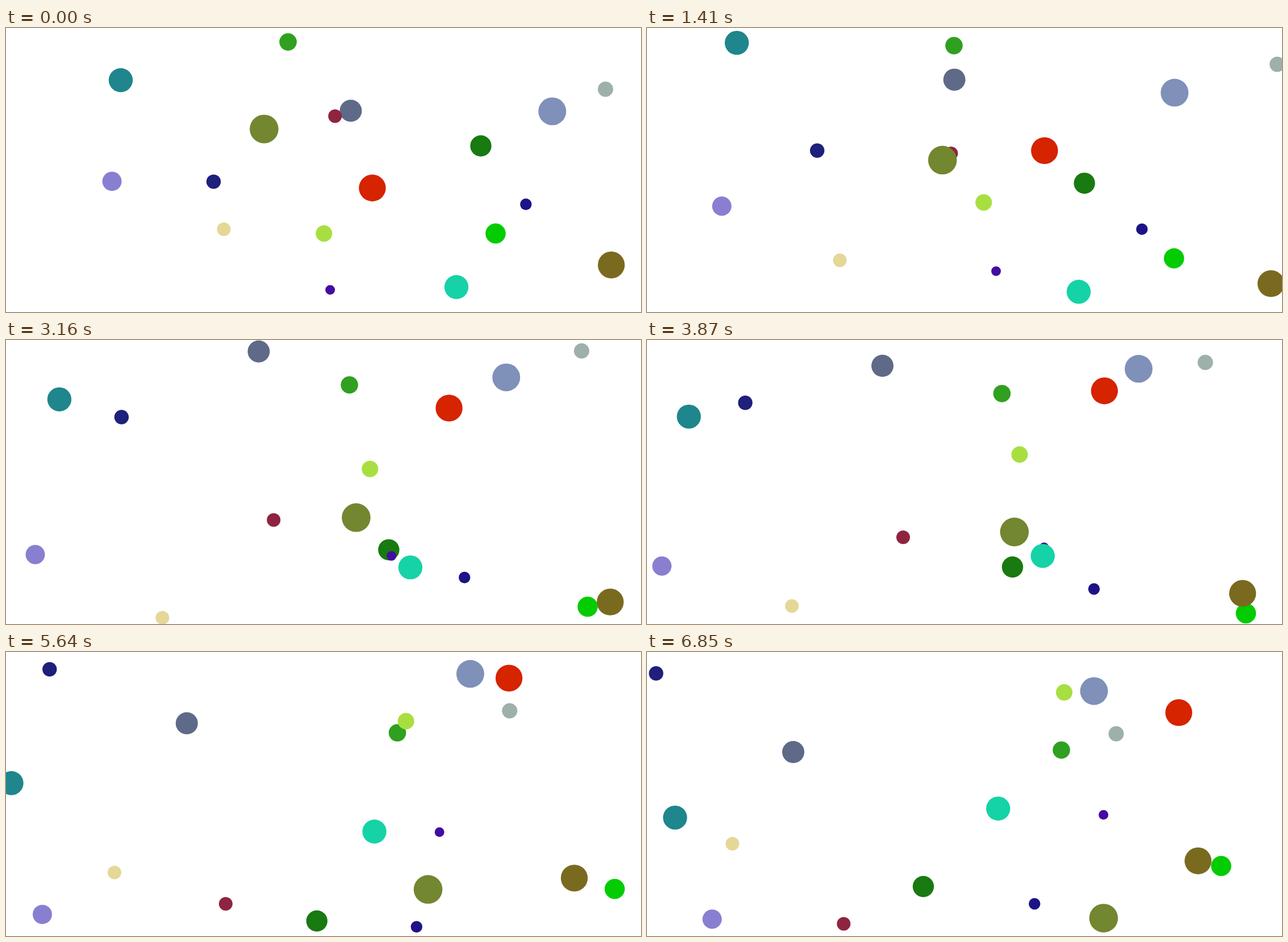
Recreate the animation shown at these times as an HTML page with a canvas. Size 1118x501 px, loop 6940 ms.

```html
<!DOCTYPE html>
<html lang="en">
<head>
<meta charset="utf-8">
<title>Bouncing balls</title>
<style>
html, body { margin: 0; width: 100%; height: 100%; overflow: hidden; background: #fff; }
canvas { display: block; }
</style>
</head>
<body>
<canvas id="stage" width="1118" height="501"></canvas>
<script>
const LOOP = 6940;
const UNIT = 0.8442; // pixels per speed unit and tick
const WALL = { left: -12, right: 1129, top: -3.9, bottom: 504.3 };

// x, y, radius, x speed, y speed, colour; painted back to front
const balls = [
  [607, 146, 19.5, -6, -5, '#5e6a87'],
  [579.3, 155.5, 12, -4, 6, '#8f2440'],
  [202, 92, 21.2, -4, -6, '#1e868c'],
  [496.6, 24.6, 15.3, 4, -3, '#30a020'],
  [1055.5, 108, 13.5, 6, -4, '#9eb0ab'],
  [836, 208, 18.7, -6, 6, '#187a10'],
  [186.6, 270.4, 17, -5, 4, '#897fd1'],
  [365.5, 271.1, 12.7, -6, -5, '#1f1f7c'],
  [645, 282.2, 23.7, 5, -6, '#d62300'],
  [915.3, 311, 10.2, -4, 4, '#1d1387'],
  [383.4, 355, 12, -4, 5, '#e5d797'],
  [559.8, 362.5, 14.5, 3, -5, '#a8df40'],
  [862, 362.5, 17.8, 6, 4, '#03cc03'],
  [1065.7, 418, 23.7, 3, 3, '#7a6a20'],
  [570.7, 462, 8.5, 4, -3, '#440ca2'],
  [793, 457, 21.2, -3, 4, '#15d3a6'],
  [454.4, 178.2, 25.3, 6, 5, '#738630'],
  [961.8, 147, 24.5, -3, -3, '#7f90b9'],
];

// Uneven clock: start time, first tick, ms per further tick (none: hold)
const bursts = [
  [0, 0], [70, 1], [220, 2], [390, 3], [540, 5], [660, 6], [840, 8],
  [980, 9, 60], [1210, 11, 80], [1920, 19, 70], [2220, 22, 70],
  [2620, 26, 88], [3400, 34, 75], [3730, 37, 86], [4420, 44, 63],
  [4800, 48, 70], [5190, 52, 55], [5460, 55, 88], [6160, 62, 88], [6850, 69],
];

function tickAt(time) {
  const next = bursts.findIndex(b => b[0] > time);
  const [start, first, step = Infinity] = bursts.at(next < 0 ? -1 : next - 1);
  const last = next < 0 ? first : bursts[next][1] - 1;
  return Math.min(first + Math.floor((time - start) / step), last);
}

const bounce = (p, lo, hi) => p < lo ? 2 * lo - p : p > hi ? 2 * hi - p : p;

const ctx = document.getElementById('stage').getContext('2d');

function draw(now) {
  const travel = tickAt(now % LOOP) * UNIT;
  ctx.fillStyle = '#fff';
  ctx.fillRect(0, 0, 1118, 501);
  for (const [x, y, r, vx, vy, color] of balls) {
    ctx.fillStyle = color;
    ctx.beginPath();
    ctx.arc(
      bounce(x + vx * travel, WALL.left + r, WALL.right - r),
      bounce(y + vy * travel, WALL.top + r, WALL.bottom - r),
      r, 0, 2 * Math.PI);
    ctx.fill();
  }
}

const origin = performance.now();
function loop() {
  draw(performance.now() - origin);
  requestAnimationFrame(loop);
}
loop();
</script>
</body>
</html>
```
